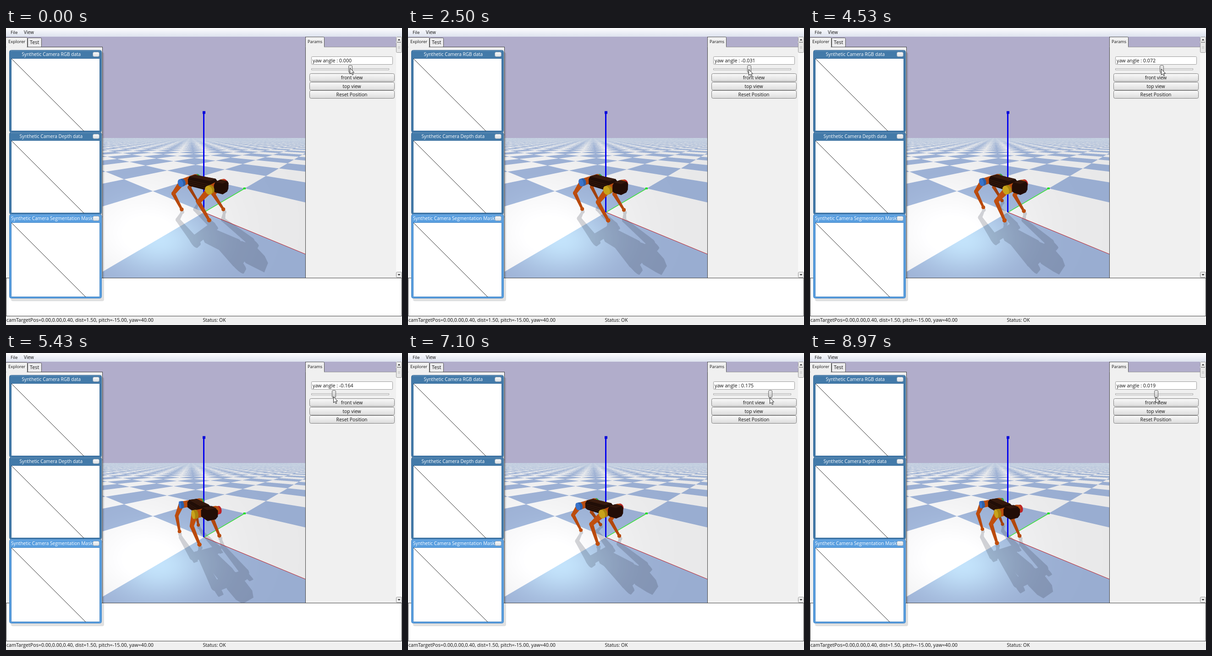
Write an HTML page with a canvas that moves like this. It is 864x648 px and loops after 9.01 s.

```html
<!DOCTYPE html>
<html lang="en">
<head>
<meta charset="utf-8">
<title>Robot yaw control</title>
<style>
html, body { margin: 0; width: 100%; height: 100%; overflow: hidden; background: #fff; }
canvas { display: block; width: 864px; height: 648px; }
</style>
</head>
<body>
<canvas id="stage" width="864" height="648"></canvas>
<script>
const W = 864, H = 648, LOOP = 9010, LAST = 8970;
const VIEW = { x: 211, y: 19, w: 442, h: 526 };
const SKY = '#b1adcb', PANEL = '#f0f0f0';
const FONT = '"Open Sans", "Noto Sans", sans-serif';
const rad = a => a * Math.PI / 180;

// time, slider value, pointer height
const SLIDER = [
  [0, 0, 88], [350, -.012, 88], [930, -.12, 90], [1570, -.227, 92], [2200, -.12, 91],
  [2800, .06, 90], [3370, .167, 89], [3730, .158, 89], [4530, .072, 90], [5400, -.16, 96],
  [5950, -.13, 99], [6370, -.03, 100], [7100, .175, 98], [7500, .19, 97],
  [8070, .189, 96], [8970, .019, 97]
];
// time, stance centre to the right and away from the eye, heading in degrees
const STANCE = [
  [0, -.016, .033, -36.6], [1570, -.015, .029, -31.8], [3370, -.052, .034, -47.3],
  [4530, -.054, .038, -47.9], [6370, -.064, .067, -52.2], [8070, -.09, .066, -57.6],
  [8970, -.089, .08, -58]
];

// Smooth curve through the rows of a table
function sample(rows, t) {
  let i = 0;
  while (i < rows.length - 2 && t > rows[i + 1][0]) i++;
  const a = rows[i], b = rows[i + 1], p = rows[i - 1] || a, n = rows[i + 2] || b;
  const span = b[0] - a[0], s = Math.min(1, (t - a[0]) / span);
  return a.slice(1).map((_, j) => {
    const c = j + 1;
    const m0 = (b[c] - p[c]) / (b[0] - p[0]) * span;
    const m1 = (n[c] - a[c]) / (n[0] - a[0]) * span;
    const s2 = s * s, s3 = s2 * s;
    return (2 * s3 - 3 * s2 + 1) * a[c] + (s3 - 2 * s2 + s) * m0 +
      (3 * s2 - 2 * s3) * b[c] + (s3 - s2) * m1;
  });
}

// Camera: right, away and up in metres, to pixels and pixels per metre
const CP = Math.cos(rad(15)), SP = Math.sin(rad(15));
const CY = Math.cos(rad(40)), SY = Math.sin(rad(40));
const DIST = 1.5 * CP, EYE = .4 + 1.5 * SP, FOCAL = 324;

function project(r, d, z) {
  const q = DIST + d, h = z - EYE;
  const k = FOCAL / (q * CP - h * SP);
  return [432 + r * k, 324 - (h * CP + q * SP) * k, k];
}
const world = (x, y, z) => project(x * CY + y * SY, y * CY - x * SY, z);

function makeCanvas() {
  const c = document.createElement('canvas');
  c.width = W;
  c.height = H;
  return c;
}

function box(g, x, y, w, h, fill, edge, round = 0) {
  const o = edge ? .5 : 0;
  g.beginPath();
  g.roundRect(x + o, y + o, w - 2 * o, h - 2 * o, round);
  g.fillStyle = fill;
  g.fill();
  if (edge) {
    g.lineWidth = 1;
    g.strokeStyle = edge;
    g.stroke();
  }
}

function line(g, x1, y1, x2, y2, color, width = 1) {
  g.beginPath();
  g.moveTo(x1, y1);
  g.lineTo(x2, y2);
  g.lineWidth = width;
  g.strokeStyle = color;
  g.stroke();
}

function fade(g, y, h, top, bottom) {
  const f = g.createLinearGradient(0, y, 0, y + h);
  f.addColorStop(0, top);
  f.addColorStop(1, bottom);
  return f;
}

function text(g, s, x, y, size = 10.2, color = '#111', align = 'left') {
  g.font = size + 'px ' + FONT;
  g.textAlign = align;
  g.textBaseline = 'alphabetic';
  g.fillStyle = color;
  g.fillText(s, x, y);
}

function drawGround(g) {
  const img = g.getImageData(VIEW.x, VIEW.y, VIEW.w, VIEW.h);
  const light = [232, 232, 233], blue = [153, 173, 209];
  const spec = [36, 48, 36], far = [196, 208, 225], N = 3;
  for (let j = 239 - VIEW.y; j < VIEW.h; j++) {
    for (let i = 0; i < VIEW.w; i++) {
      let white = 0, hit = 0, depth = 0;
      for (let n = 0; n < N * N; n++) {
        const px = VIEW.x + i + (n % N + .5) / N;
        const v = (VIEW.y + j + (Math.floor(n / N) + .5) / N - 324) / FOCAL;
        const low = SP + CP * v;
        if (low < .008) continue;
        const q = EYE * (CP - SP * v) / low;
        const r = (px - 432) / FOCAL * (q * CP + EYE * SP), d = q - DIST;
        const x = Math.floor(r * CY - d * SY), y = Math.floor(r * SY + d * CY);
        if (((x + y) & 1) === 0) white++;
        hit++;
        depth += q;
      }
      if (!hit) continue;
      const x = VIEW.x + i, y = VIEW.y + j;
      const glow = Math.exp(-(((x - 335) / 105) ** 2) - ((y - 462) / 70) ** 2);
      const wide = Math.exp(-(((x - 280) / 190) ** 2) - ((y - 430) / 150) ** 2);
      const w = white / hit;
      const haze = Math.min(1, Math.max(0, (depth / hit - 6) / 24)) * .85;
      for (let c = 0; c < 3; c++) {
        const a = light[c] + 18 * wide + 10 * glow;
        const b = blue[c] + 7 * wide + spec[c] * glow;
        const mix = w * a + (1 - w) * b;
        const full = mix + (far[c] - mix) * haze;
        const o = (j * VIEW.w + i) * 4 + c;
        img.data[o] += (full - img.data[o]) * hit / (N * N);
      }
    }
  }
  g.putImageData(img, VIEW.x, VIEW.y);
}

function drawAxes(g) {
  const o = world(0, 0, 0), x = world(1, 0, 0), y = world(0, 1, 0), z = world(0, 0, 1);
  line(g, o[0], o[1], x[0], x[1], '#b8202c', 1.1);
  line(g, o[0], o[1], y[0], y[1], '#3ee03e', 1.6);
  box(g, y[0] - 3, y[1] - 2, 5, 4, '#10e010');
  line(g, o[0] - .5, o[1], z[0] - .5, z[1], '#0505ee', 3);
  box(g, z[0] - 3, z[1] - 3, 6, 6, '#0505d8');
}

function drawWindow(g, title, tx, y, inner, color, edge) {
  const top = y + 18;
  box(g, 11, y + 5, 203, inner + 23, 'rgba(0,0,0,.12)', null, 4);
  box(g, 7, y, 202, inner + 22, color, edge, 4);
  line(g, 10, y + 1.5, 206, y + 1.5, 'rgba(255,255,255,.25)');
  box(g, 11, top, 194, inner + 1, '#fff', edge);
  line(g, 12, top + 1, 12 + inner, top + 1 + inner, '#222');
  text(g, title, tx, top - 5.5, 10.1, '#fff');
  box(g, 189, y + 4, 15, 11, fade(g, y + 4, 11, '#fafafa', '#d8dde2'), '#8a9fb2', 3);
}

function drawPanels(g) {
  box(g, 0, 0, W, 19, fade(g, 0, 19, '#fdfdfe', '#dde2ee'));
  text(g, 'File', 10, 13, 9.8);
  text(g, 'View', 39, 13, 10);

  // Left side
  box(g, 0, 41, 211, 504, PANEL);
  line(g, 46, 41.5, 211, 41.5, '#444');
  line(g, 210.5, 41, 210.5, 545, '#444');
  box(g, 47, 21, 31, 21, '#ececee', '#555', 2);
  box(g, -1, 20, 48, 23, PANEL, '#555', 2);
  box(g, 0, 42, 46, 3, PANEL);
  text(g, 'Explorer', 5, 33, 9.5);
  text(g, 'Test', 52, 35, 10.8);

  // Right side
  box(g, 653, 41, 198, 504, PANEL);
  line(g, 653.5, 19, 653.5, 545, '#444');
  line(g, 695, 41.5, 851, 41.5, '#999');
  box(g, 653, 19, 42, 24, PANEL, '#555', 2);
  box(g, 654, 41, 40, 4, PANEL);
  text(g, 'Params', 658, 33, 9.2);
  box(g, 666, 62, 178, 18, '#fff', '#9a9a9a', 2);
  box(g, 666, 88, 170, 4, '#f8f8f8', '#a4a4a4');
  [['front view', 99], ['top view', 118], ['Reset Position', 136]].forEach(([s, y]) => {
    box(g, 662, y, 186, 18, fade(g, y, 18, '#fbfbfb', '#dadada'), '#808080', 3);
    text(g, s, 754.5, y + 12.5, 10.3, '#111', 'center');
  });

  // Scroll bar
  box(g, 851, 19, 13, 526, '#f9f9f9');
  box(g, 851, 19, 13, 12, '#ededed', '#999', 2);
  box(g, 851, 31, 13, 23, '#e8e8e8', '#999', 2);
  box(g, 851, 532, 13, 13, '#ededed', '#999', 2);
  [[27, -3], [537, 3]].forEach(([y, h]) => {
    g.beginPath();
    g.moveTo(854.5, y);
    g.lineTo(860.5, y);
    g.lineTo(857.5, y + h);
    g.fillStyle = '#222';
    g.fill();
  });
  [40.5, 42.5, 44.5].forEach(y => line(g, 855, y, 860, y, '#c4c4c4'));

  // Output area and status
  box(g, 0, 545, W, 84, '#fff', '#444');
  box(g, 0, 629, W, 19, PANEL);
  text(g, 'camTargetPos=0.00,0.00,0.40, dist=1.50, pitch=-15.00, yaw=40.00', 1, 641, 10.7);
  text(g, 'Status: OK', 429.5, 641, 10.4);

  drawWindow(g, 'Synthetic Camera RGB data', 34.5, 48, 158, '#437aa9', '#34699a');
  drawWindow(g, 'Synthetic Camera Depth data', 29.5, 227, 158, '#437aa9', '#34699a');
  drawWindow(g, 'Synthetic Camera Segmentation Mask', 11, 406, 162, '#5a9fe0', '#3f83c4');
}

function hull(points) {
  const p = points.slice().sort((a, b) => a[0] - b[0] || a[1] - b[1]);
  const half = list => {
    const out = [];
    for (const c of list) {
      while (out.length > 1) {
        const a = out[out.length - 2], b = out[out.length - 1];
        if ((b[0] - a[0]) * (c[1] - a[1]) - (b[1] - a[1]) * (c[0] - a[0]) > 0) break;
        out.pop();
      }
      out.push(c);
    }
    out.pop();
    return out;
  };
  return half(p).concat(half(p.reverse()));
}

const TRUNK = [[-.07, .295], [-.07, .353], [-.045, .378], [.045, .378],
  [.07, .353], [.07, .295], [.045, .272], [-.045, .272]];
const HIP_X = .178, HIP_Y = .128, HIP_Z = .322, FOOT_X = .183, FOOT_Y = .137;
const THIGH = .2, CALF = .2;
// Ground shift of a shadow per metre of height
const CAST = { r: .5, d: -1.52 };

// Draws the robot, or its cast shadow when tint is given
function drawRobot(g, pose, tint) {
  const place = a => (x, y) => [
    pose.r + x * Math.cos(a) - y * Math.sin(a),
    pose.d + x * Math.sin(a) + y * Math.cos(a)
  ];
  const onBody = place(pose.body), onFeet = place(pose.feet);
  const see = ([r, d, z]) =>
    tint ? project(r + CAST.r * z, d + CAST.d * z, 0) : project(r, d, z);
  const at = (x, y, z) => [...onBody(x, y), z];

  function solid(points, color) {
    const h = hull(points.map(see));
    g.beginPath();
    h.forEach(p => g.lineTo(p[0], p[1]));
    g.closePath();
    g.fillStyle = tint || color;
    g.fill();
  }
  function limb(a, b, ra, rb, color) {
    const p = see(a), q = see(b), u = ra * p[2], v = rb * q[2];
    const n = Math.atan2(q[1] - p[1], q[0] - p[0]) + Math.PI / 2;
    const c = Math.cos(n), s = Math.sin(n);
    g.fillStyle = tint || color;
    g.beginPath();
    g.moveTo(p[0] + c * u, p[1] + s * u);
    g.lineTo(q[0] + c * v, q[1] + s * v);
    g.lineTo(q[0] - c * v, q[1] - s * v);
    g.lineTo(p[0] - c * u, p[1] - s * u);
    g.fill();
    [[p, u], [q, v]].forEach(([o, w]) => {
      g.beginPath();
      g.arc(o[0], o[1], w, 0, 7);
      g.fill();
    });
  }
  function prism(x1, x2, shape, side, top) {
    const ring = x => shape.map(([y, z]) => at(x, y, z));
    solid([...ring(x1), ...ring(x2)], side);
    if (tint) return;
    solid([x1, x2].flatMap(x => [at(x, -.05, shape[2][1]), at(x, .05, shape[3][1])]), top);
  }
  function ridge(x1, x2, y, z) {
    if (tint) return;
    const a = see(at(x1, y, z)), b = see(at(x2, y, z));
    line(g, a[0], a[1], b[0], b[1], 'rgba(96,48,24,.5)', .9);
  }
  function motor(fx, fy, color, face) {
    const ring = y => Array.from({ length: 16 }, (_, i) => {
      const a = i * Math.PI / 8;
      return at(fx * HIP_X + .041 * Math.cos(a), fy * y, HIP_Z + .041 * Math.sin(a));
    });
    const outer = ring(.143);
    solid([...ring(.11), ...outer], color);
    if (fy < 0) solid(outer, face);
  }
  function leg(fx, fy, color, shade) {
    const hip = at(fx * HIP_X, fy * HIP_Y, HIP_Z);
    const foot = [...onFeet(fx * FOOT_X, fy * FOOT_Y), .018];
    const v = foot.map((c, i) => c - hip[i]);
    const len = Math.min(Math.hypot(...v), THIGH + CALF - .001);
    const dir = v.map(c => c / len);
    const back = [-Math.cos(pose.body), -Math.sin(pose.body), 0];
    const dot = back[0] * dir[0] + back[1] * dir[1];
    const bend = back.map((c, i) => c - dot * dir[i]);
    const size = Math.hypot(...bend);
    const along = (THIGH ** 2 + len ** 2 - CALF ** 2) / (2 * len);
    const out = Math.sqrt(Math.max(0, THIGH ** 2 - along ** 2));
    const knee = hip.map((c, i) => c + dir[i] * along + bend[i] / size * out);
    limb(knee, foot, .021, .013, shade);
    limb(hip, knee, .031, .021, color);
    limb(foot, foot, .02, .02, color);
  }
  const crossbar = fx => {
    limb(at(fx * HIP_X, .1, HIP_Z + .008), at(fx * HIP_X, -.1, HIP_Z), .039, .038, '#b84c10');
  };

  leg(-1, 1, '#a8450f', '#a0400d');
  motor(-1, 1, '#2fa843');
  leg(1, 1, '#b84b0e', '#b3470d');
  motor(1, 1, '#bd2428');
  crossbar(-1);
  prism(-.14, .135, TRUNK, '#210e07', '#2d150b');
  [-.04, -.013, .013, .04].forEach(y => ridge(-.13, .125, y, .378));
  [.345, .325, .305].forEach(z => ridge(-.13, .125, -.07, z));
  leg(-1, -1, '#bd4d0e', '#b8490d');
  motor(-1, -1, '#2d5fa8', '#3a74cc');
  crossbar(1);
  prism(.185, .268, TRUNK.map(([y, z]) => [y * .95, z]), '#220d06', '#34170c');
  leg(1, -1, '#c04f0e', '#ba4a0d');
  motor(1, -1, '#a8830f', '#c8a31b');
}

function drawPointer(g, x, y) {
  const shape = [[0, 0], [0, 13], [3, 10.3], [5.2, 15], [7.2, 14], [5.1, 9.5], [9, 9.5]];
  g.beginPath();
  shape.forEach(([a, b]) => g.lineTo(x + a, y + b));
  g.closePath();
  g.fillStyle = '#fff';
  g.fill();
  g.lineWidth = 1;
  g.strokeStyle = '#222';
  g.stroke();
}

const ctx = document.getElementById('stage').getContext('2d');
const base = makeCanvas(), shade = makeCanvas();
const shadeCtx = shade.getContext('2d');

const baseCtx = base.getContext('2d', { willReadFrequently: true });
box(baseCtx, 0, 0, W, H, SKY);
drawGround(baseCtx);
drawPanels(baseCtx);

function draw(t) {
  const [value, pointerY] = sample(SLIDER, t);
  const [r, d, heading] = sample(STANCE, t);
  const pose = { r, d, feet: rad(heading), body: rad(heading) + value * 1.25 };

  ctx.drawImage(base, 0, 0);
  ctx.save();
  ctx.beginPath();
  ctx.rect(VIEW.x, VIEW.y, VIEW.w, VIEW.h);
  ctx.clip();
  shadeCtx.clearRect(0, 0, W, H);
  drawRobot(shadeCtx, pose, '#2b3040');
  ctx.globalAlpha = .2;
  ctx.drawImage(shade, 0, 0);
  ctx.globalAlpha = 1;
  drawAxes(ctx);
  drawRobot(ctx, pose);
  ctx.restore();

  const knob = Math.round(751 + value * 222);
  const label = value.toFixed(3).replace(/^-(0\.000)$/, '$1');
  text(ctx, 'yaw angle : ' + label, 669, 74.5, 10.7);
  box(ctx, knob - 4, 81, 9, 17, fade(ctx, 81, 17, '#f0f0f0', '#c4c4c4'), '#666', 2.5);
  drawPointer(ctx, knob - .5, Math.round(pointerY) - .5);
}

const start = performance.now();
function tick() {
  draw(Math.min((performance.now() - start) % LOOP, LAST));
  requestAnimationFrame(tick);
}
tick();
</script>
</body>
</html>
```
